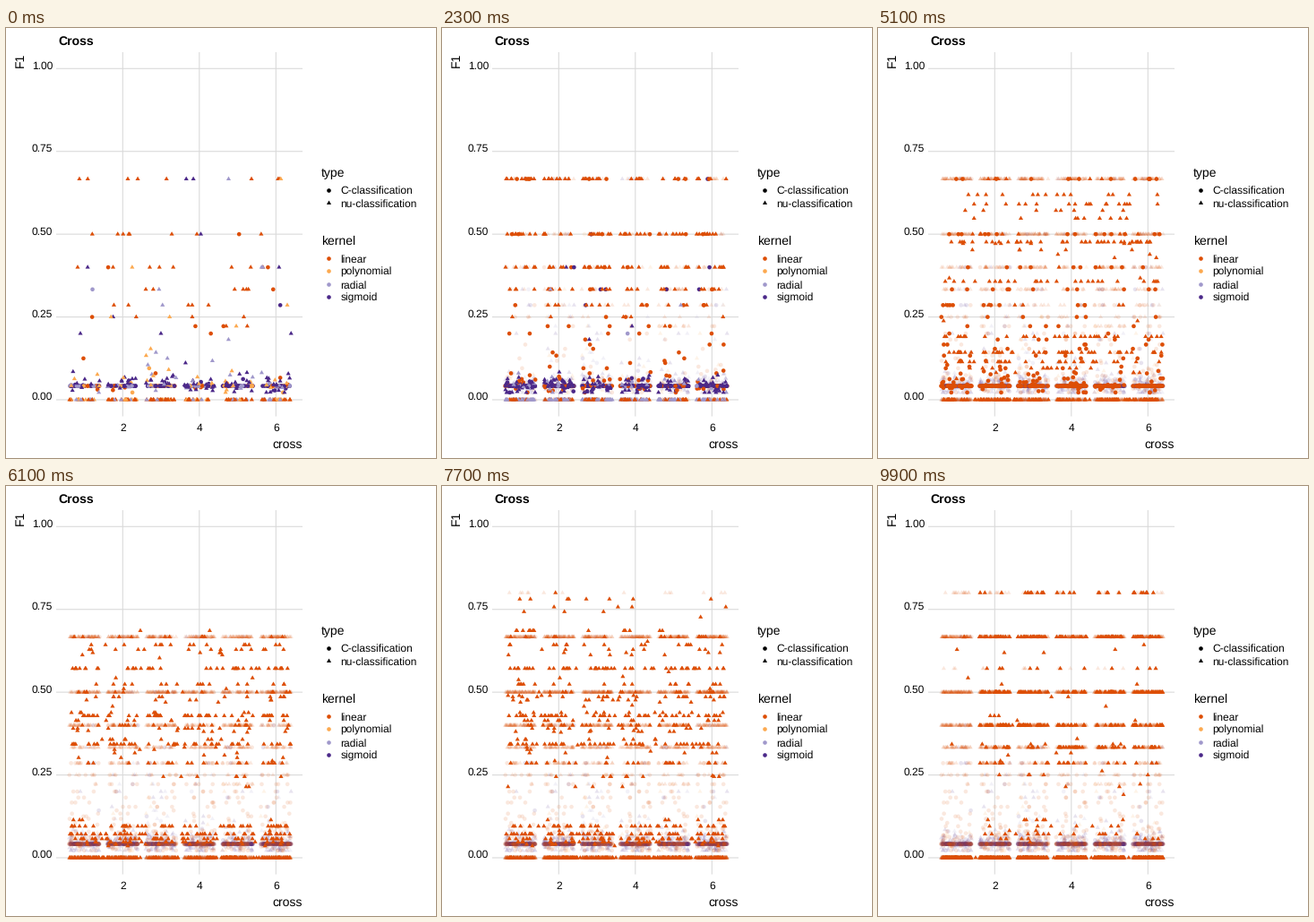
A matplotlib script for the animation above (10 s loop, 480 by 480 pixels).

```python
import numpy as np
import matplotlib.pyplot as plt
from matplotlib.animation import FuncAnimation
from matplotlib.colors import to_rgb
from matplotlib.markers import MarkerStyle

plt.rcParams["font.family"] = "Liberation Sans"
plt.rcParams["text.hinting"] = "none"
rng = np.random.default_rng(7)

DPI = 100
PX = 72 / DPI
KERNELS = ["linear", "polynomial", "radial", "sigmoid"]
COLORS = np.array([to_rgb(c) for c in ("#dd4e05", "#fca94f", "#a098cb", "#4b2889")])
LIN, POLY, RAD, SIG = range(4)
C, NU = 0, 1
MARKS = ["o", (3, 0, 0)]
SIZES = [(4.6 * PX) ** 2, (5.9 * PX) ** 2]
BASE = 1 / 24

# State k rests from RESTS[k], then tweens to the next one from MOVES[k].
STATES = 9
RESTS = [0, 12, 23, 34, 45, 56, 67, 78, 88, 100]
MOVES = [6 + 11 * k for k in range(STATES)]

# Last state in which each group still has points
LAST = {(LIN, C): 4, (POLY, C): 1, (RAD, C): 2, (SIG, C): 3,
        (LIN, NU): 8, (POLY, NU): 1, (RAD, NU): 2, (SIG, NU): 2}


def px(cross):
    return 44.8 + 42.75 * cross


def py(f1):
    return 415 - 369.7 * f1


def haze(n):
    return np.clip(rng.normal(0.045, 0.016, n), 0.022, 0.1)


def strays(n):
    """Scores of the form 2/m, thinning out towards large m."""
    return 2 / (3 + np.floor(rng.exponential(7, n)))


def linear_nu(k):
    """Zeros plus levels 2/m whose counts follow a bell over m."""
    m = np.arange(3, 10)
    peak = min(8 + 20 * k, 125)
    mid = np.interp(k, [2, 3, 4, 5], [4, 3, 3, 4])
    width = np.interp(k, [0, 2, 3, 4, 5], [4, 2.6, 1.5, 1.5, 2.2])
    counts = np.round(peak * np.exp(-((m - mid) / width) ** 2)).astype(int)
    zeros = int(np.interp(k, [0, 2, 5], [75, 70, 310]))
    rare = max(k - 5, 0)
    return [np.zeros(zeros), np.repeat(2 / m, counts),
            np.full(14 * rare, 4 / 5), np.full(4 * rare, 4 / 7)]


def scores(kernel, kind, k):
    if (kernel, kind) == (LIN, NU):
        parts = linear_nu(k)
    elif kind == NU:
        few = 10 + 16 * k if k < 2 else 3
        zeros, near = (0, 75 + 25 * k) if kernel == SIG else (30 + 48 * k, 22)
        parts = [np.zeros(zeros), haze(near), strays(few)]
    elif kernel == LIN:
        parts = [np.full(int(30 * 1.5 ** k), BASE), haze(10 + 16 * k),
                 strays(10 + 26 * k)]
    elif kernel == SIG:
        parts = [np.full(110 + 40 * k, BASE), haze(10 + 5 * k), strays(1 + 4 * k)]
    else:
        parts = [np.full(48, BASE), haze(3), strays(1)]
    return np.concatenate(parts)


def build(k):
    """Jittered points of one state, keyed by (kernel, type)."""
    state = {}
    for key, last in LAST.items():
        if k > last:
            continue
        v = scores(*key, k)
        low = np.where((v > 0) & (k == STATES - 1), 2, 1)
        cross = rng.integers(low, 7) + rng.uniform(-0.4, 0.4, v.size)
        state[key] = np.column_stack([px(cross), py(v)])
    return state


def pair(a, b):
    """Match points of two states; unmatched ones of a wait in place."""
    n = min(len(a), len(b))
    a, b = rng.permutation(a), rng.permutation(b)

    def ordered(p):
        return p[np.argsort(p[:, 0] + rng.normal(0, 28, len(p)))]

    return (np.vstack([ordered(a[:n]), a[n:]]),
            np.vstack([ordered(b[:n]), a[n:]]))


def scene(now, nxt=None):
    """Start points, end points and colours for each type."""
    out = []
    for kind in (C, NU):
        starts, ends, cols = [np.empty((0, 2))], [np.empty((0, 2))], [np.empty((0, 3))]
        for key in sorted(now):
            if key[1] != kind:
                continue
            a = b = now[key]
            if nxt and key in nxt:
                a, b = pair(a, nxt[key])
            starts.append(a)
            ends.append(b)
            cols.append(np.tile(COLORS[key[0]], (len(a), 1)))
        a, b, c = (np.vstack(p) for p in (starts, ends, cols))
        if nxt is None:
            mix = rng.permutation(len(a))
            a, b, c = a[mix], b[mix], c[mix]
        out.append((a, b, c))
    return out


states = [build(k) for k in range(STATES)]
still = [scene(s) for s in states]
tween = [scene(s, states[(k + 1) % STATES]) for k, s in enumerate(states)]

fig = plt.figure(figsize=(480 / DPI, 480 / DPI), dpi=DPI, facecolor="white")
ax = fig.add_axes([0, 0, 1, 1])
ax.set_xlim(0, 480)
ax.set_ylim(480, 0)
ax.axis("off")


def label(x, y, s, size=12, **kw):
    ax.text(x, y, s, fontsize=size * PX, color="black", **kw)


def dots(x, y, kind, color, z=3):
    return ax.scatter(x, y, s=SIZES[kind], marker=MarkerStyle(MARKS[kind]),
                      c=color, linewidths=0, zorder=z)


def rule(xs, ys):
    ax.plot(xs, ys, color="#dadada", lw=1.1 * PX, zorder=1,
            solid_capstyle="butt", snap=False)


for v in (0, 0.25, 0.5, 0.75, 1):
    rule([56, 331], [py(v)] * 2)
    label(52, py(v) + 0.3, f"{v:.2f}", ha="right")
for c in (2, 4, 6):
    rule([px(c)] * 2, [27, 433.5])
    label(px(c), 449.5, str(c), ha="center")

label(58, 19, "Cross", 14, weight="bold")
label(331, 469, "cross", 14, ha="right")
label(16.5, 36, "F1", 14, rotation=90, ha="center", va="center")
label(352, 165, "type", 14)
label(352, 242, "kernel", 14)
for kind, name in enumerate(["C-classification", "nu-classification"]):
    y = 180.6 + 14.4 * kind
    dots([359.5], [y], kind, "black")
    label(373.5, y + 4.4, name)
for k, name in enumerate(KERNELS):
    y = 257 + 14.4 * k
    dots([359.5], [y], C, [COLORS[k]])
    label(373.5, y + 4.6, name)

shadows = []
for parts in still:
    layer = []
    for kind, (a, _, cols) in enumerate(parts):
        faint = np.column_stack([cols, np.full(len(cols), 0.13)])
        layer.append(dots(a[:, 0], a[:, 1], kind, faint, 2))
    shadows.append(layer)
live = [dots([], [], kind, "black", 4) for kind in (C, NU)]


def draw(f):
    k = sum(f >= r for r in RESTS[1:])
    moving = f >= MOVES[k]
    t = (f - MOVES[k] + 1) / (RESTS[k + 1] - MOVES[k] + 1) if moving else 0
    for j, layer in enumerate(shadows):
        for art in layer:
            art.set_visible(j < k or (j == k and moving))
    for art, (a, b, cols) in zip(live, (tween if moving else still)[k]):
        art.set_offsets(a + (b - a) * t)
        art.set_facecolor(cols)
    return live


anim = FuncAnimation(fig, draw, frames=100, interval=100, repeat=True,
                     repeat_delay=0, blit=False)
plt.show()
```
